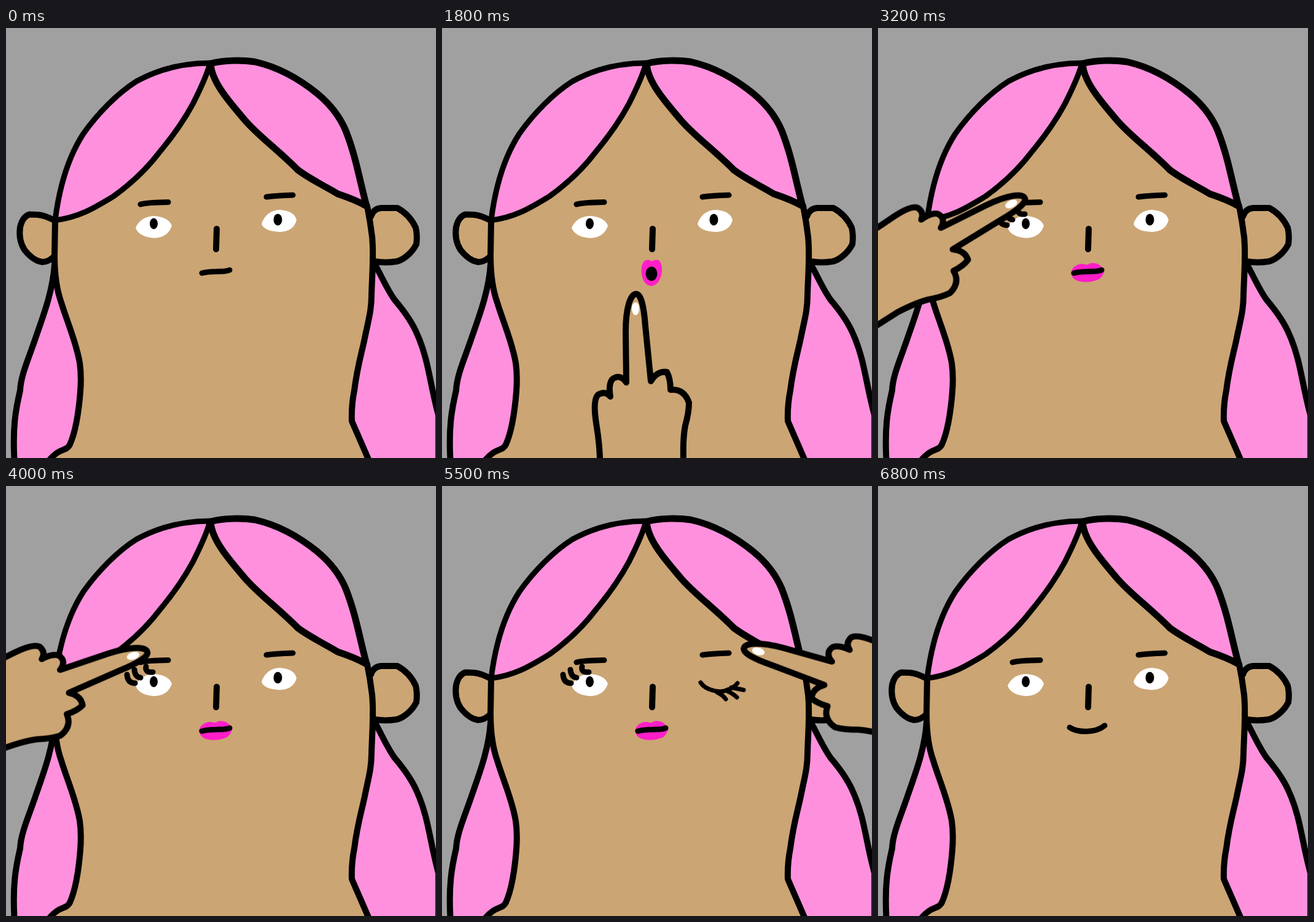
An HTML page without scripts that plays this animation: 700 px wide and 700 px high, repeating every 6.9 s.

```html
<!DOCTYPE html>
<html lang="en">
<head>
<meta charset="utf-8">
<title>Make-up</title>
<style>
html, body { margin: 0; height: 100%; overflow: hidden; background: #a0a0a0; }
svg { display: block; width: 100vw; height: 100vh; }
.line { fill: none; stroke: #000; stroke-width: 10; stroke-linecap: round; stroke-linejoin: round; }
.skin { fill: #cba574; }
.hair { fill: #ff90dd; }
.pink { fill: #ff1ec8; }
.white { fill: #fff; }
.thin { stroke-width: 9; }
.fine { stroke-width: 7; }
.bold { stroke-width: 11; }
.anim { animation: 6.9s step-end infinite; }

/* mouths */
.flat { animation-name: flat; }
.round { animation-name: round; }
.paint { animation-name: paint, round; }
.lips { animation-name: lips; }
.smile { animation-name: smile; }
@keyframes flat { 0% { opacity: 1 } 14.49% { opacity: 0 } 30.43% { opacity: 1 } 85.5% { opacity: 0 } }
@keyframes round { 0% { opacity: 0 } 14.49% { opacity: 1 } 30.43% { opacity: 0 } }
@keyframes paint {
  0% { clip-path: inset(0 100% 0 0) }
  17.39% { clip-path: inset(0 60% 0 0) }
  18.84% { clip-path: inset(0 35% 0 0) }
  20.28% { clip-path: inset(0 0 0 0) }
}
@keyframes lips { 0% { opacity: 0 } 30.43% { opacity: 1 } 98.55% { opacity: 0 } }
@keyframes smile { 0% { opacity: 0 } 85.5% { opacity: 1 } }

/* eyes */
.open-l { animation-name: open-l; }
.shut-l { animation-name: shut-l; }
.lash-l { animation-name: lash-l; }
.open-r { animation-name: open-r; }
.shut-r { animation-name: shut-r; }
.lash-r { animation-name: lash-r; }
.brows { animation-name: brows; }
@keyframes open-l { 0% { opacity: 1 } 33.33% { opacity: 0 } 37.68% { opacity: 1 } }
@keyframes shut-l { 0% { opacity: 0 } 33.33% { opacity: 1 } 37.68% { opacity: 0 } }
@keyframes lash-l { 0% { opacity: 0 } 37.68% { opacity: 1 } 97.1% { opacity: 0 } }
@keyframes open-r { 0% { opacity: 1 } 78.26% { opacity: 0 } 81.15% { opacity: 1 } }
@keyframes shut-r { 0% { opacity: 0 } 78.26% { opacity: 1 } 81.15% { opacity: 0 } }
@keyframes lash-r { 0% { opacity: 0 } 73.91% { opacity: 1 } 78.26% { opacity: 0 } 81.15% { opacity: 1 } 97.1% { opacity: 0 } }
@keyframes brows {
  0%, 89.85%, 92.75%, 95.65% { transform: none }
  88.4%, 91.3%, 94.2% { transform: translateY(-16px) }
}

/* the fingertip is the hand's origin */
.hand { animation-name: hand; }
@keyframes hand {
  0%, 84.05% { transform: translate(316px, 1000px) }
  /* lips */
  14.49% { transform: translate(318px, 560px) }
  15.94% { transform: translate(322px, 465px) }
  17.39% { transform: translate(301px, 420px) }
  18.84% { transform: translate(318px, 408px) }
  20.28% { transform: translate(355px, 415px) }
  21.73% { transform: translate(325px, 424px) }
  23.18% { transform: translate(347px, 418px) }
  24.63% { transform: translate(330px, 424px) }
  26.08% { transform: translate(316px, 433px) }
  27.53% { transform: translate(316px, 520px) }
  28.98% { transform: translate(316px, 635px) }
  /* left eye */
  30.43% { transform: translate(60px, 490px) rotate(45deg) }
  31.88% { transform: translate(130px, 430px) rotate(45deg) }
  33.33% { transform: translate(188px, 378px) rotate(45deg) }
  34.78% { transform: translate(213.4px, 352.6px) rotate(45deg) }
  36.23% { transform: translate(220px, 330px) rotate(51deg) }
  37.68% { transform: translate(225px, 305px) rotate(57deg) }
  40.57%, 46.37%, 52.17% { transform: translate(239px, 277px) rotate(64.2deg) }
  43.47%, 49.27%, 55.07% { transform: translate(346px, 258px) rotate(70.5deg) }
  57.97% { transform: translate(230px, 270px) rotate(72deg) }
  59.42% { transform: translate(110px, 275px) rotate(72deg) }
  60.86% { transform: translate(-40px, 280px) rotate(72deg) }
  /* right eye */
  62.31% { transform: translate(640px, 320px) scale(-1, 1) rotate(75deg) }
  63.76% { transform: translate(540px, 305px) scale(-1, 1) rotate(75deg) }
  65.21%, 71.01% { transform: translate(445px, 291px) scale(-1, 1) rotate(75deg) }
  68.11%, 75.36%, 79.71% { transform: translate(491.5px, 264px) scale(-1, 1) rotate(75deg) }
  73.91%, 78.26% { transform: translate(498px, 255px) scale(-1, 1) rotate(75deg) }
  81.15% { transform: translate(560px, 268px) scale(-1, 1) rotate(75deg) }
  82.6% { transform: translate(650px, 280px) scale(-1, 1) rotate(75deg) }
}
</style>
</head>
<body>
<svg viewBox="0 0 700 700">
  <defs>
    <path id="lashes" class="line thin" d="M197 307Q198 321 210 321M209 299Q210 311 219 312M228 294Q226 304 239 303"/>
  </defs>

  <!-- long hair -->
  <path class="line hair" d="M79 385C76 430 60 470 48 505C38 535 24 565 23 590C16 620 10 650 14 710H140V400Z"/>
  <path class="line hair" d="M600 384C612 405 620 425 633 443C650 463 662 480 670 500C688 540 690 580 704 630V720H540V400Z"/>

  <!-- ears -->
  <path class="line skin" d="M80 314Q64 305 52 304L38 303.500Q27 307 23 324Q20 345 30 361Q44 379 59 381Q70 381 80 370"/>
  <path class="line skin" d="M594 307Q598 294 611 293H637C650 300 660 310 667 325Q670 338 668 352C660 368 645 378 636 380Q618 383 600 380"/>

  <!-- face -->
  <path class="line skin" d="M80 313L79 370C79 400 82 425 90 447C100 480 114 510 120 545Q123 565 121 592C118 630 112 660 104 678C98 690 88 682 70 704L70 720H600L590 702L563 640Q562 615 567 590C572 550 580 525 584 505C590 475 595 460 595 435C596 400 599 370 596 340Q593 315 588 290L333 58Z"/>

  <!-- top hair -->
  <path class="line thin hair" d="M80 313C86 265 100 212 126 172C150 138 182 106 212 87C250 66 290 57 332 57C328 75 317 98 305 122C290 150 270 178 250 202C225 235 200 256 175 274C145 292 120 308 80 313Z"/>
  <path class="line bold hair" d="M333 58C355 52 385 52 405 55C445 64 480 85 507 107C531 127 545 148 553 167C570 210 576 250 587 290C570 280 555 275 540 270C515 255 495 246 475 231C440 196 410 175 388 149C368 125 335 90 333 58Z"/>

  <!-- eyes -->
  <g class="anim open-l">
    <path class="white" d="M211 325Q220 306 242 306Q265 308 270 322Q264 341 241 342Q216 340 211 325Z"/>
    <ellipse cx="240.500" cy="318.500" rx="6.500" ry="9"/>
  </g>
  <path class="anim line thin shut-l" d="M214 327Q226 338 242 338Q260 336 267 323"/>
  <g class="anim lash-l"><use href="#lashes"/></g>
  <g class="anim open-r">
    <path class="white" d="M416 319Q423 297 446 296Q470 298 473 313Q468 331 446 332Q420 331 416 319Z"/>
    <ellipse cx="442.500" cy="312" rx="7" ry="9.500"/>
  </g>
  <path class="anim line fine shut-r" d="M421 320C430 334 455 337 464 332Q475 329 481 321M471 328L491 332M463 333Q474 338 480 344M448 336Q457 340 462 347"/>
  <g class="anim lash-r"><use href="#lashes" transform="translate(684 -7) scale(-1 1)"/></g>
  <path class="anim line thin brows" d="M219 287Q230 284 264 283.500M424 275Q438 273 467 272"/>

  <path class="line" d="M343 327L342 360"/>

  <!-- mouth -->
  <path class="anim pink lips" d="M314 399C315 389 326 383 334 384Q341 387 345 383Q357 381 364 389L368 397Q366 404 360 409Q345 415 332 413Q317 412 314 399Z"/>
  <path class="anim line thin flat" d="M319 399Q329 396.500 342 396.500L355 396Q361 395.500 364 394"/>
  <path class="anim line thin smile" d="M312 393Q322 400 340 399.500Q358 399 369 390"/>
  <path class="anim pink paint" d="M325 401Q323 385 330 379Q337 375 341 380Q348 375 354 379Q360 387 357 402Q353 418 341 420Q328 419 325 401Z"/>
  <ellipse class="anim round" cx="341" cy="400" rx="9.500" ry="11.500"/>

  <!-- hand -->
  <g class="anim hand">
    <path class="line skin" d="M-55 820L-59 267C-60 235 -64 220 -66 203Q-70 172 -62 164Q-50 157 -42 167C-45 150 -42 138 -34 136Q-24 132 -16 144L-17 62C-17 22 -9 0 0 0C9 0 13 25 15 52L24 142Q34 125 50 127Q56 138 56 156Q78 154 86 177Q86 193 80 214Q76 235 77 267L82 310L83 820"/>
    <ellipse class="white" cx="-1" cy="24" rx="6" ry="10.500"/>
  </g>
</svg>
</body>
</html>
```
